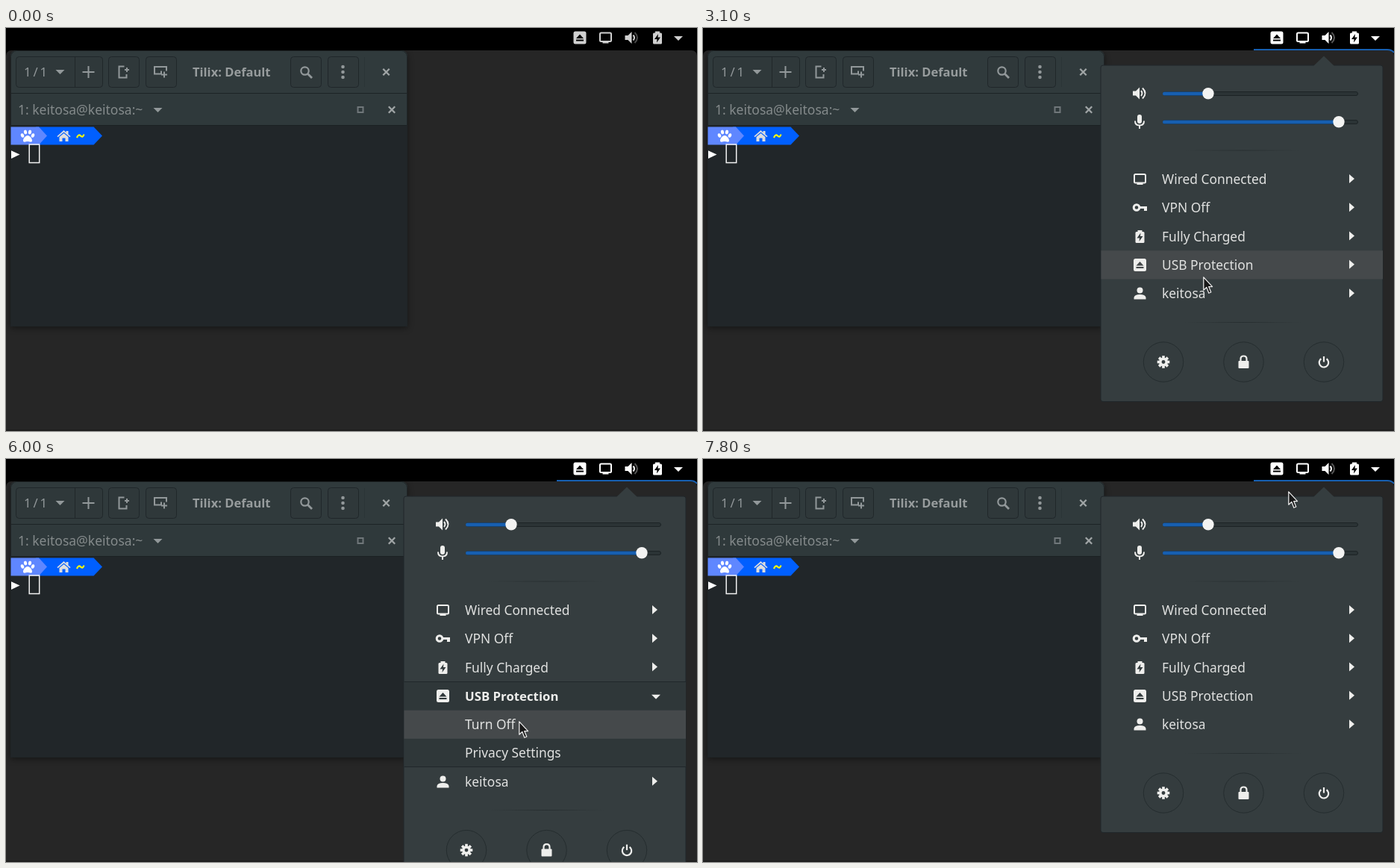
An HTML page with a canvas for the animation above (8000 ms loop, 926 px wide and 540 px high).

```html
<!DOCTYPE html>
<html lang="en">
<head>
<meta charset="utf-8">
<title>USB protection menu</title>
<style>
html, body { margin: 0; width: 100%; height: 100%; overflow: hidden; background: #000; }
canvas { display: block; width: 926px; height: 540px; }
</style>
</head>
<body>
<canvas id="stage" width="926" height="540"></canvas>
<script>
const c = document.getElementById('stage').getContext('2d');
const LOOP = 8000, STEP = 100;
const USER = 'keitosa';
const SANS = '"Noto Sans", "Open Sans", sans-serif';
const MENU = '#353d3f', SUB = '#2f3739', HOVER = '#45494b';
const LIGHT = '#eeeeec', LABEL = '#e0e1e0', DULL = '#92989a', EDGE = '#20272a', BLUE = '#175fb0';
const ROW = 38.3, ROW_TOP = 183.3;

// time, x, y of the pointer tip
const POINTER = [
  [900, 428, 365], [1300, 797, 24], [1400, 797, 24], [1500, 790, 20],
  [1600, 790, 20], [1700, 779, 13], [2600, 779, 12], [3100, 670, 333],
  [3400, 670, 333], [3800, 666, 318], [4600, 666, 318], [4700, 677, 343],
  [5300, 685, 392], [5500, 685, 392], [5800, 688, 360], [5900, 688, 360],
  [6000, 687, 351], [6100, 687, 351], [6300, 689, 319], [7000, 689, 319],
  [7100, 778, 199], [7300, 781, 135], [7400, 781, 135], [7800, 784, 43]
];

const clamp = v => Math.max(0, Math.min(1, v));
const easeOut = v => 1 - (1 - clamp(v)) ** 2;

function pointerAt(t) {
  const i = POINTER.findIndex(k => k[0] >= t);
  if (i === 0) return POINTER[0].slice(1);
  if (i < 0) return POINTER[POINTER.length - 1].slice(1);
  const [t0, x0, y0] = POINTER[i - 1], [t1, x1, y1] = POINTER[i];
  const p = (t - t0) / (t1 - t0);
  return [x0 + (x1 - x0) * p, y0 + (y1 - y0) * p];
}

function subOpenAt(t) {
  if (t < 4200 || t >= 6800) return 0;
  if (t < 6500) return easeOut((t - 4100) / 200);
  return 1 - easeOut((t - 6400) / 400);
}

function rect(x, y, w, h, fill) {
  c.fillStyle = fill;
  c.fillRect(x, y, w, h);
}
function box(x, y, w, h, r, fill, line, lw = 1) {
  c.beginPath();
  c.roundRect(x, y, w, h, r);
  if (fill) { c.fillStyle = fill; c.fill(); }
  if (line) { c.strokeStyle = line; c.lineWidth = lw; c.stroke(); }
}
function disc(x, y, r, fill, line) {
  c.beginPath();
  c.ellipse(x, y, r, r, 0, 0, 7);
  if (fill) { c.fillStyle = fill; c.fill(); }
  if (line) { c.strokeStyle = line; c.lineWidth = 1; c.stroke(); }
}
function fillPath(d, color) {
  c.fillStyle = color;
  c.fill(new Path2D(d));
}
function linePath(d, color, lw) {
  c.strokeStyle = color;
  c.lineWidth = lw;
  c.stroke(new Path2D(d));
}
function text(s, x, y, size, color, bold) {
  c.font = `${bold ? 'bold ' : ''}${size}px ${SANS}`;
  c.fillStyle = color;
  c.fillText(s, x, y);
}
function at(x, y, draw, ...args) {
  c.save();
  c.translate(x, y);
  draw(...args);
  c.restore();
}

// Icons are centred on 0,0; bg colours their cut-outs.
const icon = {
  eject(col, bg) {
    box(-8.5, -8.5, 17, 17, 2.5, col);
    fillPath('M-5 1L0-4.5 5 1Z', bg);
    rect(-5, 2.5, 10, 2, bg);
  },
  screen(col) {
    box(-7.5, -6.5, 15, 11.5, 1.5, null, col, 2);
    rect(-4, 5, 8, 2.5, col);
  },
  speaker(col, bg, dim) {
    fillPath('M-9-3H-5L0-8V8L-5 3H-9Z', col);
    linePath('M2-3.5Q5 0 2 3.5', col, 2);
    linePath('M4-7Q11 0 4 7', dim, 2);
  },
  battery(col, bg) {
    rect(-3, -8.5, 6, 3, col);
    box(-6, -6.5, 12, 15, 1.5, col);
    fillPath('M1-5L-4 2H-.5L-1 6.5 4-.5H.5Z', bg);
  },
  mic(col) {
    box(-3, -9.5, 6, 12, 3, col);
    linePath('M-6-1Q-6 5 0 5Q6 5 6-1M0 5V9.5', col, 2);
  },
  key(col) {
    c.strokeStyle = col;
    c.lineWidth = 3;
    c.beginPath();
    c.arc(-4.5, 0, 3.8, 0, 7);
    c.stroke();
    fillPath('M-1-1.5H9.5V4.5H5.5V1.5H-1Z', col);
  },
  person(col) {
    disc(0, -4, 4, col);
    fillPath('M-8 8V5.5Q-7 1.5 0 1.5Q7 1.5 8 5.5V8Z', col);
  },
  gear(col, bg) {
    for (let i = 0; i < 4; i++) {
      rect(-1.8, -8.3, 3.6, 16.6, col);
      c.rotate(Math.PI / 4);
    }
    disc(0, 0, 5.9, col);
    disc(0, 0, 2.4, bg);
  },
  lock(col) {
    box(-7, -1.5, 14, 10, 1, col);
    linePath('M-4-1V-4Q-4-8 0-8Q4-8 4-4V-1', col, 2.2);
  },
  power(col) {
    c.strokeStyle = col;
    c.lineWidth = 2.2;
    c.beginPath();
    c.arc(0, .8, 6.2, -0.95, Math.PI + 0.95);
    c.stroke();
    rect(-1.1, -7.5, 2.2, 7.5, col);
  },
  down(col) { fillPath('M-6-3H6L0 3Z', col); },
  right(col) { fillPath('M-3-6L4 0-3 6Z', col); },
  cross(col) { linePath('M-4.2-4.2L4.2 4.2M4.2-4.2L-4.2 4.2', col, 2.3); },
  plus(col) { linePath('M-8 0H8M0-8V8', col, 2); },
  addRight(col) { linePath('M1.5-7.5H-5.5V7.5H4.5V3M2-3H8M5-6V0', col, 2); },
  addDown(col) { linePath('M1-1V3H-8V-6.5H8V-1M5 0V8M1 4H9', col, 2); },
  search(col) {
    disc(-1.5, -1.5, 5.2);
    c.strokeStyle = col;
    c.lineWidth = 2.2;
    c.stroke();
    linePath('M2.5 2.5L8 8', col, 2.8);
  },
  dots(col) { for (const y of [-7, 0, 7]) disc(0, y, 2.3, col); },
  paw(col) {
    fillPath('M-6 6C-6 2-2-1 0-1S6 2 6 6C6 9 2 7 0 7S-6 9-6 6Z', col);
    for (const [x, y] of [[-7, -1], [-3, -5.5], [3, -5.5], [7, -1]]) {
      c.beginPath();
      c.ellipse(x, y, 2.1, 2.9, x / 20, 0, 7);
      c.fill();
    }
  },
  house(col) {
    fillPath('M-9 0L0-8 3-5V-7H6V-2.5L9 0 8 1.2 0-5.5-8 1.2Z', col);
    fillPath('M-6 1L0-4 6 1V7H2V2.5H-2V7H-6Z', col);
  }
};

function drawPanel(lit) {
  const col = lit ? '#fff' : '#d0d0d0';
  at(769, 13, icon.eject, col, '#000');
  at(803.5, 13, icon.screen, col);
  at(838.5, 13, icon.speaker, col, '#000', lit ? '#555' : '#484848');
  at(873, 13, icon.battery, col, '#000');
  at(901, 14, icon.down, col);
}

function drawPrompt() {
  fillPath('M40 132.5H117.5L129 144.5 117.5 156.5H40Z', '#005fff');
  fillPath('M6.5 132.5H44L55 144.5 44 156.5H6.5Z', '#5f87ff');
  at(29, 145, icon.paw, '#fff');
  at(77.5, 145, icon.house, '#dedede');
  linePath('M95 147Q97 141.5 100 144.5T104.5 142.5', '#ffff00', 2.2);
  fillPath('M7 164.3L18.5 169.6 7 175Z', '#fff');
  c.strokeStyle = '#f2f2f2';
  c.lineWidth = 1.5;
  c.strokeRect(31.2, 156, 13.5, 24.5);
}

function drawTerminal(scrollbar) {
  c.save();
  c.shadowColor = 'rgba(0,0,0,.45)';
  c.shadowBlur = 9;
  c.shadowOffsetY = 2;
  box(6, 30, 532, 370, [8, 8, 0, 0], '#212629');
  c.restore();
  box(6, 30, 532, 57, [8, 8, 0, 0], '#303a3c');
  rect(6, 87, 532, 1, '#1d2325');
  rect(6, 88, 532, 42, '#2f393b');
  rect(6, 130, 532, 1, '#1b2123');
  box(6.5, 30.5, 531, 369, [8, 8, 0, 0], null, '#1f2527');

  for (const [x, w] of [[13, 116], [137, 41], [187, 41], [381, 41], [431, 41]])
    box(x + .5, 38.5, w, 41, 4, '#2f383a', EDGE);
  rect(92, 39, 1, 40, EDGE);
  rect(480, 39, 1, 40, '#2b3436');
  text('1\u2009/\u20091', 24, 65, 16.8, DULL);
  at(72.5, 59, icon.down, DULL);
  at(110.5, 59, icon.plus, DULL);
  at(157, 59, icon.addRight, DULL);
  at(207, 58.5, icon.addDown, DULL);
  text('Tilix: Default', 250, 65, 16.5, '#979c9d', true);
  at(402, 59, icon.search, DULL);
  at(451.5, 59, icon.dots, DULL);
  at(509.5, 59, icon.cross, '#a0a5a6');

  text(`1: ${USER}@${USER}:~`, 16, 115.5, 17.5, '#848a8b');
  at(203.5, 110, icon.down, DULL);
  c.strokeStyle = '#70777a';
  c.lineWidth = 2;
  c.strokeRect(471.5, 106, 7, 7);
  at(517, 109.5, icon.cross, '#a0a5a6');

  drawPrompt();
  if (scrollbar) box(533, 270, 4, 126, 2, '#808486');
}

function drawSlider(y, knob) {
  box(616.5, y - 2.5, 261, 5, 2.5, '#2b3335', '#1c2325');
  box(616, y - 2.5, knob - 616, 5, 2.5, BLUE);
  disc(knob, y - .3, 7.7, '#f3f3f2');
}

function drawSeparator(y) {
  const g = c.createLinearGradient(645, 0, 803, 0);
  g.addColorStop(0, 'rgba(35,42,44,0)');
  g.addColorStop(.5, 'rgba(35,42,44,.8)');
  g.addColorStop(1, 'rgba(35,42,44,0)');
  rect(645, y, 158, 1, g);
}

function drawRow(y, label, mark, hot, open) {
  const bg = hot ? HOVER : open ? SUB : MENU;
  const mid = y + ROW / 2;
  if (hot) rect(533.5, y, 377.5, ROW, HOVER);
  if (mark) {
    at(585.5, Math.round(mid - .5) + .5, mark, LIGHT, bg, LIGHT);
    if (open) at(871, mid + 1.5, icon.down, LIGHT);
    else at(869, mid - .5, icon.right, LIGHT);
  }
  text(label, 615, Math.round(mid + 6.5), open ? 16.8 : 17.4, open ? LIGHT : LABEL, open);
}

function drawMenu(open, checked, px, py) {
  const extra = 2 * ROW * open;
  const hot = y => px > 533 && py >= y && py < y + ROW;
  const rowY = i => ROW_TOP + i * ROW;

  box(533, 50, 378, 450.5 + extra, 3, MENU, '#20272a');
  fillPath('M818 51L832 37.5 846 51Z', MENU);
  at(585, 87.5, icon.speaker, LIGHT, MENU, LIGHT);
  at(585, 125.5, icon.mic, LIGHT);
  drawSlider(88, 677);
  drawSlider(126, 852);
  drawSeparator(163.5);

  const rows = [['Wired Connected', icon.screen], ['VPN Off', icon.key],
    ['Fully Charged', icon.battery]];
  rows.forEach(([label, mark], i) => drawRow(rowY(i), label, mark, hot(rowY(i))));

  const usb = rowY(3);
  if (open > 0) rect(533.5, usb, 377.5, ROW + extra, SUB);
  drawRow(usb, 'USB Protection', icon.eject, hot(usb), checked);
  if (open > 0) {
    c.save();
    c.beginPath();
    c.rect(533, usb + ROW, 378, extra);
    c.clip();
    drawRow(rowY(4), 'Turn Off', null, hot(rowY(4)));
    drawRow(rowY(5), 'Privacy Settings', null, hot(rowY(5)));
    c.restore();
    rect(533.5, 298, 377.5, 1, EDGE);
    rect(533.5, Math.round(rowY(4) + extra - 1), 377.5, 1, EDGE);
  }
  const last = rowY(4) + extra;
  drawRow(last, USER, icon.person, open === 0 && hot(last));
  drawSeparator(Math.round(393.5 + extra));

  [icon.gear, icon.lock, icon.power].forEach((mark, i) => {
    const x = 617 + i * 107.5, y = 447.5 + extra;
    disc(x, y, 26.7, '#343c3e', '#252d2f');
    at(x, y, mark, LIGHT, MENU);
  });
}

function drawPointer(x, y) {
  c.lineJoin = 'round';
  const d = 'M.8.8V18.2L4.8 14.5 7.8 22.3 10.8 21 7.7 13.6H12.6Z';
  at(x, y, () => {
    fillPath(d, '#181818');
    linePath(d, '#ececec', 1.25);
  });
  c.lineJoin = 'miter';
}

function draw(t) {
  const [px, py] = pointerAt(t);
  const shown = easeOut((t - 2000) / 500);
  rect(0, 0, 926, 540, '#000');
  box(0, 30, 926, 510, [7, 7, 0, 0], '#262626');
  rect(0, 538, 926, 2, '#1e1e1e');
  drawTerminal(t >= 1000 && t < 2700);
  drawPanel(t >= 1300);

  if (shown > 0) {
    c.save();
    c.globalAlpha = shown;
    linePath('M738 29H917Q923 29 926 33', BLUE, 2);
    c.translate(0, -12 * (1 - shown));
    drawMenu(subOpenAt(t), t >= 4200 && t < 6500, px, py);
    c.restore();
  }
  if (t >= 800) drawPointer(px, py);
}

function tick() {
  draw(Math.floor(performance.now() % LOOP / STEP) * STEP);
  requestAnimationFrame(tick);
}
tick();
</script>
</body>
</html>
```
